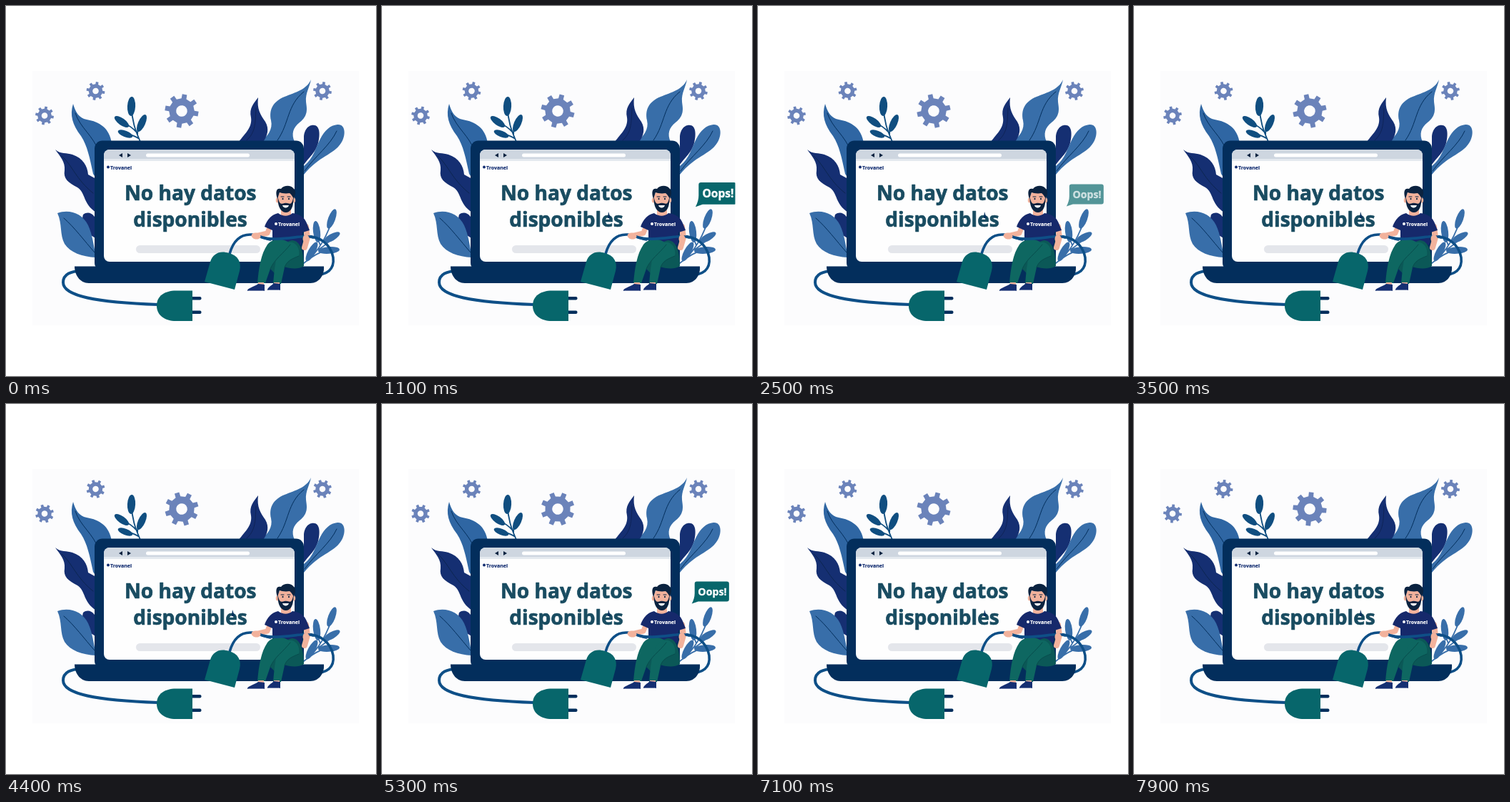
Recreate the animation shown at these times as an HTML page with a canvas. Size 518 px wide and 518 px high, loop 8 s.

```html
<!DOCTYPE html>
<html lang="es">
<head>
<meta charset="utf-8">
<title>No hay datos disponibles</title>
<style>
html, body { margin: 0; width: 100%; height: 100%; overflow: hidden; background: #fff; }
canvas { display: block; width: 518px; height: 518px; }
</style>
</head>
<body>
<canvas id="stage"></canvas>
<script>
const SIZE = 518, LOOP = 8000, CYCLE = 4000;
const FONT = '"Open Sans", "Noto Sans", sans-serif';
const NAVY = '#032e5c', BLUE = '#386ea9', MID = '#2f66a3', INDIGO = '#152f72';
const TEAL = '#07666b', CABLE = '#0e4f87', SKIN = '#f2b29c', INK = '#0b2340', GEAR = '#6b83ba';
const BRAND = 'Trovanel';

const canvas = document.getElementById('stage');
const ctx = canvas.getContext('2d');
const dpr = window.devicePixelRatio || 1;
canvas.width = canvas.height = SIZE * dpr;

function shape(color, d) {
  ctx.fillStyle = color;
  ctx.fill(new Path2D(d));
}

function line(color, width, d) {
  ctx.strokeStyle = color;
  ctx.lineWidth = width;
  ctx.lineCap = ctx.lineJoin = 'round';
  ctx.stroke(new Path2D(d));
}

function box(color, x, y, w, h, r) {
  ctx.fillStyle = color;
  ctx.beginPath();
  ctx.roundRect(x, y, w, h, r);
  ctx.fill();
}

function oval(color, x, y, rx, ry, turn = 0) {
  ctx.fillStyle = color;
  ctx.beginPath();
  ctx.ellipse(x, y, rx, ry, turn, 0, Math.PI * 2);
  ctx.fill();
}

// bold text, thickened by a hairline outline
function text(color, size, str, x, y, align = 'center', heavy = size * 0.025) {
  ctx.fillStyle = ctx.strokeStyle = color;
  ctx.font = `700 ${size}px ${FONT}`;
  ctx.textAlign = align;
  ctx.lineWidth = heavy;
  ctx.lineJoin = 'round';
  ctx.fillText(str, x, y);
  ctx.strokeText(str, x, y);
}

function brand(color, x, y) {
  oval(color, x + 2, y - 3, 2, 2);
  text(color, 7, BRAND, x + 5, y, 'left');
}

function gear(x, y, r, turn) {
  const teeth = 8, step = Math.PI * 2 / teeth, body = r * 0.75;
  ctx.save();
  ctx.translate(x, y);
  ctx.rotate(turn);
  ctx.beginPath();
  for (let i = 0; i < teeth; i++) {
    const a = i * step - Math.PI / 2;
    for (const [off, rad] of [[-0.25, body], [-0.18, r], [0.18, r], [0.25, body]]) {
      const b = a + off * step;
      ctx.lineTo(Math.cos(b) * rad, Math.sin(b) * rad);
    }
  }
  ctx.closePath();
  ctx.moveTo(r * 0.33, 0);
  ctx.arc(0, 0, r * 0.33, 0, Math.PI * 2);
  ctx.fillStyle = GEAR;
  ctx.fill('evenodd');
  ctx.restore();
}

function leaves() {
  // left side
  shape(MID, 'M94 137C97 148 102 157 113 159C131 162 145 171 148 192L132 250L122 235C117 212 114 196 105 182C93 166 89 153 94 137Z');
  line(NAVY, 1, 'M97 150C104 171 122 181 130 204');
  shape(INDIGO, 'M69 201C77 208 85 205 93 208C108 213 114 224 115 236L126 242V289C107 276 112 262 100 254C87 247 80 242 82 230C83 218 76 211 69 201Z');
  line('#0c2550', 1, 'M78 210C93 223 98 243 122 262');
  shape(INDIGO, 'M108 292C117 285 126 294 127 303V326C113 319 104 305 108 292Z');
  shape(BLUE, 'M72 290C88 284 107 290 115 307C121 320 123 336 126 352C106 351 90 345 82 333C75 320 79 305 72 290Z');
  line(NAVY, 1, 'M81 297C95 309 110 329 124 345');

  // sprig
  const sprig = '#104e80';
  line(sprig, 1.8, 'M176 142C176 160 181 174 188 190M184 180C184 172 187 166 190 162M182 176C176 169 170 166 163 163M185 185C179 181 174 180 168 179');
  oval(sprig, 175.5, 140.5, 5.6, 13.5, 0.05);
  oval(sprig, 190, 164, 5, 13, 0.42);
  oval(sprig, 162, 162, 4.8, 12, -0.95);
  oval(sprig, 167, 179, 4.4, 11, -1.2);

  // right side
  shape(BLUE, 'M427 103C421 117 405 121 390 127C373 134 368 146 371 160C374 173 366 182 357 190H404C399 179 402 170 411 163C424 153 421 143 420 134C419 122 425 114 427 103Z');
  line(NAVY, 1, 'M417 120C393 139 397 164 380 188');
  shape(INDIGO, 'M353 128C351 144 356 152 363 162C369 172 366 182 360 190H326C335 178 345 170 343 156C340 143 347 136 353 128Z');
  line('#0f2457', 1, 'M350 143C349 166 349 177 337 188');
  shape(INDIGO, 'M428 167C440 165 440 180 437 192C433 206 424 212 417 222V182C418 174 422 168 428 167Z');
  shape(BLUE, 'M464 166C476 165 476 182 469 192C459 208 438 210 417 236V224C431 213 433 199 440 186C446 174 454 167 464 166Z');
  line(NAVY, 1, 'M463 175C454 195 433 210 418 231');
  line(BLUE, 1.8, 'M417 360C438 346 452 317 459 292M437 341C446 337 453 328 462 322M426 353C440 343 454 341 464 342M440 335C436 325 434 319 432 313');
  oval(BLUE, 456, 298, 5, 14.5, 0.35);
  oval(BLUE, 435, 316, 5, 15, -0.12);
  oval(BLUE, 456, 324, 4.8, 13, 1.05);
  oval(BLUE, 452, 342, 4.8, 15, 1.5);
  oval(BLUE, 428, 344, 5, 15, 0.5);
}

function cablesBehind() {
  line(CABLE, 4, 'M110 371C90 370 80 376 80 387C80 406 125 415 213 418');
  line(CABLE, 3.6, 'M412 323C440 319 455 335 458 352C460 369 450 377 429 377');
}

function laptop() {
  box(NAVY, 124, 188.5, 293, 182, 11);
  box('#fefefe', 137, 201, 267, 157, 8);
  box('#ced6e0', 137, 201, 267, 16, [8, 8, 0, 0]);
  box('#e4e9ef', 137, 214, 267, 3, 0);
  shape(INK, 'M163 206V212L158 209ZM170 206V212L175 209Z');
  box('#fff', 196, 206.5, 145, 5, 2.5);
  box('#e4e6eb', 182, 335, 174, 11, 5.5);
  brand(INDIGO, 141, 228.5);
  text('#194c61', 28.1, 'No hay datos', 258.3, 272.3);
  text('#194c61', 28.1, 'disponibles', 258, 309.3);
  shape(NAVY, 'M96 364.5H445C446 376 439 388 426 388H116C103 388 96 376 96 364.5Z');
}

function plugs() {
  box(NAVY, 259, 407, 14.5, 4.6, 2);
  box(NAVY, 259, 426.5, 14.5, 4.6, 2);
  shape(TEAL, 'M261 398.5V441H238C222 441 211 433 211 419.5C211 406 222 398.5 238 398.5Z');
  line(CABLE, 3.6, 'M313 347C318 329 328 319 344 320C354 321 361 325 370 327');
  shape(TEAL, 'M278 386L286 358C290 346 300 342 312 346C325 349 330 359 327 371L320 397Z');
}

function man() {
  // head
  shape(SKIN, 'M385 282H399V292C394 298 389 297 385 292Z');
  oval(SKIN, 391.5, 271, 11, 14);
  oval(SKIN, 380, 272, 2.2, 3.4);
  oval(SKIN, 403, 272, 2.2, 3.4);
  shape(INK, 'M380.5 267C380 284 387 289 392 289C397 289 403 284 402.5 267C401 275 399 278 396 276.5C393 275.5 390 275.5 388 276.5C384 278 382 275 380.5 267Z');
  shape(INK, 'M380 270C377 261 378 254 385 256C389 250 400 251 402 255C407 258 405 265 403 270C401 267 400 264 397 262C391 263 386 262 383 261Z');
  oval(INK, 387.5, 270, 1, 1.2);
  oval(INK, 396, 270, 1, 1.2);
  line(INK, 1, 'M385 267H389M394 267H398');
  shape('#fff', 'M387 279H396C395 283.5 388 283.5 387 279Z');

  // arms and shirt
  line(SKIN, 7, 'M370 307L366 318L349 322');
  line(SKIN, 8, 'M420 309L422 324L418 338');
  shape('#16296b', 'M381 290C388 295 395 295 401 290C411 291 418 296 421 304L425 314L415 317L414 334H373V314L362 309C366 298 372 292 381 290Z');
  brand('#fff', 376, 308);

  // legs
  const green = '#0e6761', shade = '#0b5857';
  shape(shade, 'M372 338L400 328C412 328 417 344 417 364C408 370 397 367 388 365L376 374L369 367Z');
  shape(green, 'M366 334C374 324 392 325 398 334C392 350 376 354 370 368L363 388H352C354 366 357 347 366 334Z');
  shape(green, 'M386 336C399 324 413 334 410 350C400 354 393 357 390 366L385 389H374C376 368 377 349 386 336Z');
  line('#084c4c', 1, 'M398 334C388 347 376 354 370 368M410 350C400 354 393 357 390 366');
  shape(SKIN, 'M353 387H361V392H353ZM375 387H383V392H375Z');
  shape(INDIGO, 'M353 389L362 390V399H338C337 395 346 394 353 389ZM375 388L384 389V398H366C366 394 371 392 375 388Z');
  line('#fff', 0.8, 'M339 399H361M367 398H383');

  // cable through the hands
  line(CABLE, 3.6, 'M356 323C371 329 394 325 412 323C419 322 425 322.5 430 324');
  oval(SKIN, 350, 322, 6.5, 4.5, 0.2);
  oval(SKIN, 420, 326, 4.5, 6);
}

function bubble(p) {
  if (p < 950 || p >= 2900) return;
  const rest = Math.pow(1 - Math.min(1, (p - 950) / 450), 3);
  const u = Math.max(0, (p - 2400) / 500);
  const out = 2.7 * u ** 3 - 1.7 * u ** 2;
  ctx.save();
  ctx.beginPath();
  ctx.rect(0, 0, 494.5, SIZE);
  ctx.clip();
  ctx.globalAlpha = Math.min(1, (p - 950) / 100, (2900 - p) / 580);
  ctx.translate(461.5 + 28 * rest + 35 * out, 263 + Math.min(1, u * 5));
  ctx.scale(1 + 0.34 * rest, 1 + 0.34 * rest);
  ctx.translate(-461, -263);
  shape(TEAL, 'M440 248.5H482Q485 248.5 485 251.5V273.5Q485 276.5 482 276.5H442L433 279.5Q437 272 437 265V251.5Q437 248.5 440 248.5Z');
  text('#fff', 14.2, 'Oops!', 461.7, 267.7);
  ctx.restore();
}

function draw(now) {
  const t = now % LOOP;
  const turn = (10 + t * 0.045) * Math.PI / 180;
  ctx.setTransform(dpr, 0, 0, dpr, 0, 0);
  box('#fff', 0, 0, SIZE, SIZE, 0);
  box('#fcfcfd', 37, 91, 457, 356, 0);
  gear(246, 147, 23.7, turn);
  gear(54, 153.5, 13, turn);
  gear(125.5, 119, 13, turn);
  gear(443, 119, 13, turn);
  leaves();
  cablesBehind();
  laptop();
  if (t >= 100) shape(NAVY, 'M317 288L320 297H316Z');
  plugs();
  man();
  bubble(t % CYCLE);
}

const start = performance.now();
function tick() {
  draw(performance.now() - start);
  requestAnimationFrame(tick);
}
tick();
</script>
</body>
</html>
```
